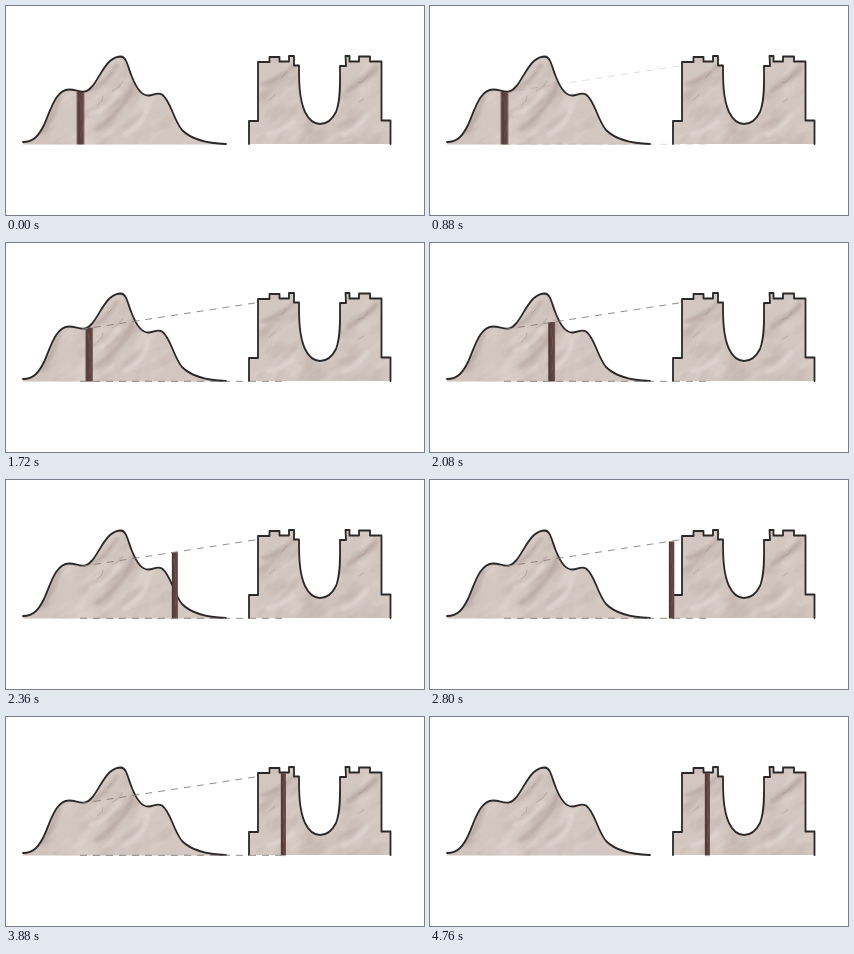
An HTML page for the animation above (5.32 s loop, 418 by 209 pixels).

```html
<!DOCTYPE html>
<html lang="en">
<head>
<meta charset="utf-8">
<title>Mountain and towers</title>
<style>
  html, body { margin: 0; width: 100%; height: 100%; overflow: hidden; background: #fff; }
  svg { display: block; width: 100vw; height: 100vh; }
  .edge { fill: none; stroke: #2a2828; stroke-width: 1.8; stroke-linejoin: round; stroke-linecap: round; }
  .sight { stroke: #85807e; stroke-width: .9; stroke-dasharray: 7 6; }
  .streak { fill: none; stroke: #ab9a94; stroke-linecap: round; filter: url(#soft); }
  .pale { stroke: #e9e0dc; }
  .crack { fill: none; stroke: #8d7a74; stroke-width: .7; opacity: .5; }
</style>
</head>
<body>
<svg viewBox="0 0 418 209" preserveAspectRatio="none">
  <defs>
    <path id="hill" d="M17 136 C28 136 33 129 38 119 C45 103 50 83.500 63 83.500 C70 83.500 73 86.500 79 85.500 C89 83 94 64 104 55 C108 51.500 112 50.500 115 50.500 C121 51 122 62 126 71 C130 81 135 89.500 142 89.500 C148 89.500 151 85.500 156 88.500 C165 95 167 113 176 124 C186 134 203 137.500 220 138"/>
    <path id="fort" d="M243 138 V115 H252 V56 H263.500 V51 H273.500 V55.500 H283 V50 H288 V59.500 H293 C293 75 293 93 299 106 C303 114 308 118 314 118 C321 118 326 114 330 106 C335 94 334 75 334 60 H340 L339.500 50 H343.500 V55.500 H353 V50.500 H364 V55.500 H375.500 V114.500 H384.500 V138"/>
    <clipPath id="inside">
      <use href="#hill"/>
      <use href="#fort"/>
      <path d="M17 136 L220 138 V138.600 H17 Z"/>
    </clipPath>
    <filter id="soft" x="-50%" y="-50%" width="200%" height="200%">
      <feGaussianBlur stdDeviation="1.600"/>
    </filter>
    <filter id="dark" x="0" y="0" width="100%" height="100%" color-interpolation-filters="sRGB">
      <feTurbulence type="fractalNoise" baseFrequency=".028 .06" numOctaves="4" seed="8"/>
      <feColorMatrix values="0 0 0 0 .63  0 0 0 0 .55  0 0 0 0 .52  2.400 0 0 0 -1.080"/>
    </filter>
    <filter id="light" x="0" y="0" width="100%" height="100%" color-interpolation-filters="sRGB">
      <feTurbulence type="fractalNoise" baseFrequency=".03 .065" numOctaves="4" seed="21"/>
      <feColorMatrix values="0 0 0 0 .92  0 0 0 0 .88  0 0 0 0 .86  2.600 0 0 0 -1.200"/>
    </filter>
    <linearGradient id="wood">
      <stop offset="0" stop-color="#493330"/>
      <stop offset=".35" stop-color="#5d403d"/>
      <stop offset="1" stop-color="#664a47"/>
    </linearGradient>
  </defs>

  <g clip-path="url(#inside)">
    <rect width="418" height="209" fill="#d2c6c0"/>
    <g transform="rotate(-38 209 104)">
      <rect x="-20" y="-90" width="460" height="400" filter="url(#dark)" opacity=".35"/>
      <rect x="-20" y="-90" width="460" height="400" filter="url(#light)" opacity=".4"/>
    </g>
    <g opacity=".5">
      <path class="streak" stroke-width="5" d="M127 77 Q122 101 91 123"/>
      <path class="streak" stroke-width="4" d="M111 59 Q102 75 86 84"/>
      <path class="streak" stroke-width="4" d="M53 91 Q47 108 37 126"/>
      <path class="streak" stroke-width="5" d="M258 78 Q275 73 288 59"/>
      <path class="streak" stroke-width="5" d="M342 84 Q357 76 370 62"/>
      <path class="streak pale" stroke-width="5" d="M142 100 Q137 119 119 128"/>
      <path class="streak pale" stroke-width="5" d="M85 108 Q100 104 113 86"/>
      <path class="streak pale" stroke-width="5" d="M262 128 Q275 126 288 116"/>
      <path class="streak pale" stroke-width="5" d="M337 129 Q350 124 361 110"/>
    </g>
    <path class="crack" d="M117 75 l-4 6 -7 4 M91 99 l5 -4 1 -5 M106 66 l-5 5 M281 65 l-5 7 M263 94 l6 -5 M362 69 l-5 6 -5 2 M353 96 l5 -3"/>
  </g>
  <use href="#hill" class="edge"/>
  <use href="#fort" class="edge"/>

  <g id="bar">
    <rect x="-3.500" y="-53" width="7" height="53" fill="url(#wood)"/>
    <path d="M-1 -48 L1 -36 L0 -24 M2 -20 L0 -8" fill="none" stroke="#79605b" stroke-width=".8" opacity=".6"/>
  </g>
  <g id="lines">
    <path class="sight" d="M75 86.400 L252 59.500"/>
    <path class="sight" d="M74 138.300 H277"/>
  </g>
</svg>
<script>
  const LOOP = 5320;
  const EASE = "ease-in-out";

  // Each step is [time, value]; every segment is eased.
  function play(id, prop, steps) {
    const frames = steps.map(([time, value]) => ({
      offset: time / LOOP, [prop]: value, easing: EASE
    }));
    document.getElementById(id).animate(frames, { duration: LOOP, iterations: Infinity });
  }

  const pose = (x, width, height) =>
    `translate(${x}px, 138.5px) scale(${width / 7}, ${height / 53})`;
  const start = pose(74.5, 7.2, 52.5);
  const end = pose(277.3, 5.2, 82.3);

  play("lines", "opacity", [[0, 0], [560, 0], [1440, 1], [3860, 1], [4740, 0], [LOOP, 0]]);
  play("bar", "transform", [[0, start], [1440, start], [3360, end], [LOOP, end]]);
</script>
</body>
</html>
```
